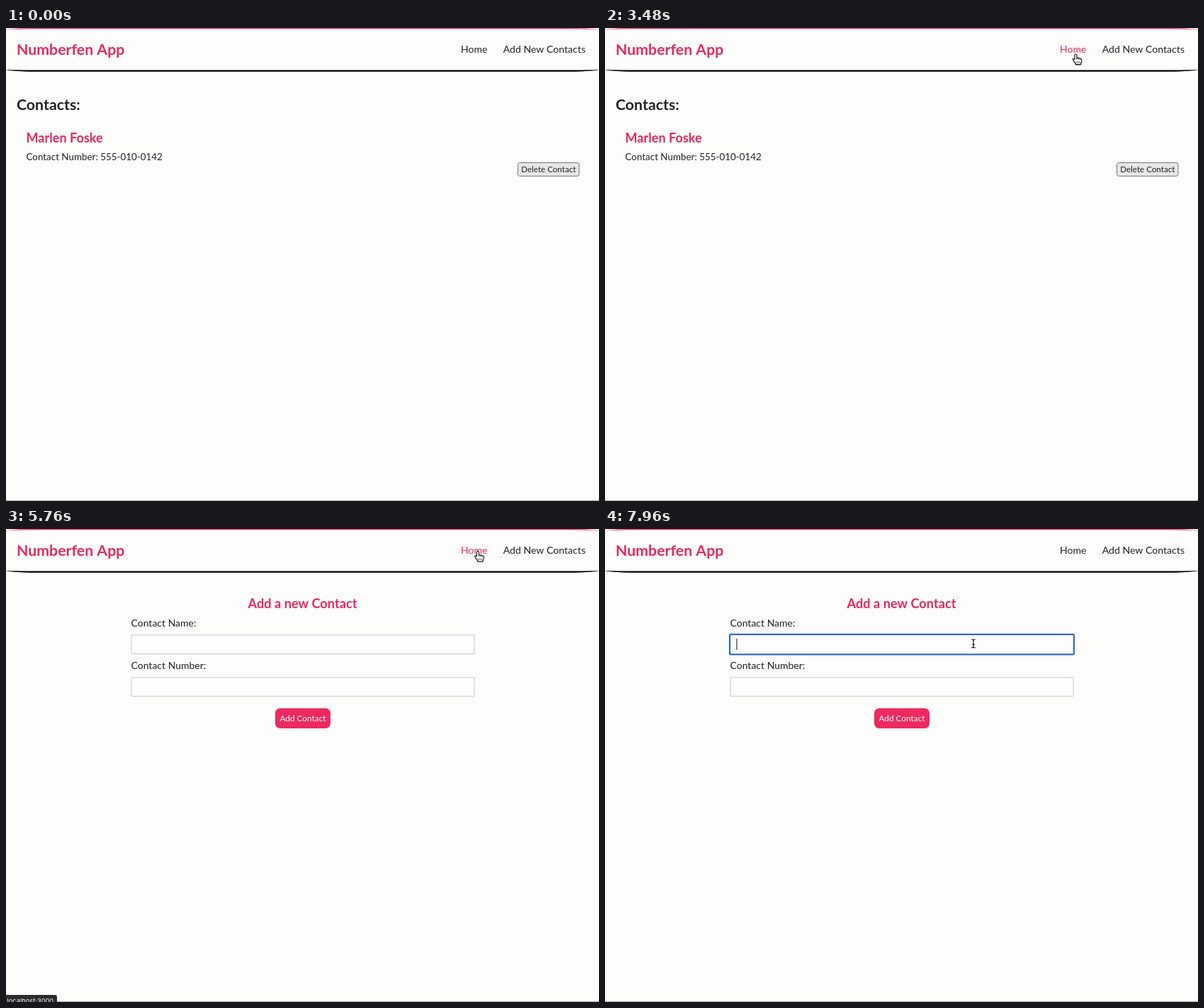
Write an HTML page with a canvas that moves like this. It is 837 by 669 pixels and loops after 8 s.

```html
<!DOCTYPE html>
<html lang="en">
<head>
<meta charset="utf-8">
<title>Contacts</title>
<style>
  html, body { margin: 0; width: 100%; height: 100%; overflow: hidden; background: #fdfdfc; }
  canvas { display: block; }
</style>
</head>
<body>
<canvas id="stage" width="837" height="669"></canvas>
<script>
const W = 837, H = 669, LOOP = 8000;
const ctx = document.getElementById('stage').getContext('2d');
const PAPER = '#fdfdfc', PINK = '#e6295f', INK = '#222';
const SANS = 'Lato, "Open Sans", sans-serif';

// Pointer hot spot: time, x, y
const path = [
  [60, -12, 286], [840, 205, 306], [1280, 387, 161], [1600, 387, 161],
  [1720, 390, 159], [2480, 659, 35], [3360, 659, 35], [3800, 690, 50],
  [4240, 730, 33], [4760, 730, 33], [5120, 700, 52], [5520, 666, 32],
  [6040, 666, 32], [6480, 730, 32], [6880, 730, 32], [7520, 520, 162], [8000, 520, 162]
];
const addPages = [[4640, 5920], [6760, LOOP]];
const clicks = [[2960, 3120], [4520, 4700], [5800, 5980], [6600, 6780], [7740, 7900]];
const statuses = [
  [2600, 3420, 'localhost:3000', 72],
  [4320, 4860, 'localhost:3000/addcontacts', 128],
  [5480, 6160, 'localhost:3000', 72],
  [6550, 6960, 'localhost:3000/addcontacts', 128]
];
const FOCUS = 7780;

const within = (t, [a, b]) => t >= a && t < b;
const clamp = v => Math.max(0, Math.min(1, v));
const inside = (p, x, y, w, h) => p.x >= x && p.x <= x + w && p.y >= y && p.y <= y + h;

function pointerAt(t) {
  if (t < path[0][0]) return { x: -50, y: 286 };
  const i = path.findIndex(k => k[0] >= t);
  if (i < 1) return { x: path[0][1], y: path[0][2] };
  const [t0, x0, y0] = path[i - 1], [t1, x1, y1] = path[i];
  const u = (1 - Math.cos(Math.PI * (t - t0) / (t1 - t0))) / 2;
  return { x: x0 + (x1 - x0) * u, y: y0 + (y1 - y0) * u };
}

function text(str, x, y, size, color = INK, weight = 400, align = 'left', family = SANS) {
  ctx.font = `${weight} ${size}px ${family}`;
  ctx.fillStyle = color;
  ctx.textAlign = align;
  ctx.fillText(str, x, y);
}

function box(x, y, w, h, r, fill, stroke, line = 1) {
  ctx.beginPath();
  ctx.roundRect(x, y, w, h, r);
  if (fill) { ctx.fillStyle = fill; ctx.fill(); }
  if (stroke) { ctx.strokeStyle = stroke; ctx.lineWidth = line; ctx.stroke(); }
}

// Header border whose thickness tapers into the rounded corners
function edge(y, dir, thick, color) {
  const rx = 42, ry = 3, inner = ry - thick;
  const k = y - dir * ry;
  ctx.beginPath();
  ctx.moveTo(0, k);
  ctx.ellipse(rx, k, rx, ry, 0, Math.PI, dir * Math.PI / 2, dir > 0);
  ctx.ellipse(W - rx, k, rx, ry, 0, dir * Math.PI / 2, 0, dir > 0);
  ctx.ellipse(W - rx, k, rx, inner, 0, 0, dir * Math.PI / 2, dir < 0);
  ctx.ellipse(rx, k, rx, inner, 0, dir * Math.PI / 2, Math.PI, dir < 0);
  ctx.fillStyle = color;
  ctx.fill();
}

function header(home, add) {
  edge(0, -1, 1.3, '#ee2b66');
  edge(61.7, 1, 2.2, '#000');
  text('Numberfen App', 15, 38, 21.3, PINK, 700);
  text('Home', 642, 35, 14, home ? PINK : INK);
  text('Add New Contacts', 818, 35, 14.1, add ? PINK : INK, 400, 'right');
}

function contacts(p) {
  text('Contacts:', 15, 116, 21.3, INK, 700);
  if (inside(p, 15, 137, 808, 82)) {
    ctx.save();
    ctx.shadowColor = 'rgba(70, 70, 130, 0.3)';
    ctx.shadowBlur = 4;
    ctx.shadowOffsetY = 1.5;
    box(15, 137.5, 808, 81.5, 0, PAPER);
    ctx.restore();
  }
  text('Marlen Foske', 28.5, 162, 18.1, PINK, 700);
  text('Contact Number: 555-010-0142', 28.5, 186.5, 13.4);
  box(722.5, 190.5, 86.5, 19, 3, '#e6e6e6', '#77777c');
  text('Delete Contact', 765.8, 204, 11.6, INK, 400, 'center');
}

function field(y, focused) {
  box(177, y, 484, 26.5, 0, '#fdfdfd', '#c9c9c7');
  if (focused) box(176, y - 1, 486, 28.5, 1, null, '#2968c8', 2);
}

function form(t) {
  const focused = t >= FOCUS;
  text('Add a new Contact', 418.5, 112, 18.2, PINK, 700, 'center');
  text('Contact Name:', 176.5, 138, 14);
  field(150, focused);
  text('Contact Number:', 176.5, 198, 14);
  field(210, false);
  if (focused) {
    ctx.fillStyle = '#111';
    ctx.fillRect(185.5, 155, 1, 16);
  }
  box(380, 253.5, 78, 28.5, 7, '#ed2a60');
  text('Add Contact', 419, 272, 11.8, '#fff', 400, 'center');
}

function status(t) {
  for (const [a, b, label, w] of statuses) {
    const alpha = Math.min(clamp((t - a) / 150), clamp((b - t) / 150));
    if (alpha <= 0) continue;
    ctx.globalAlpha = alpha;
    box(0, 659, w, 14, [0, 3, 0, 0], '#2b2b2d');
    text(label, 1.5, 670.5, 9.3, '#f4f4f4', 400, 'left', 'Inter, "Noto Sans", sans-serif');
    ctx.globalAlpha = 1;
  }
}

const arrow = new Path2D('M0 0V12L2.8 9.4L4.7 13.8L6.7 13L4.8 8.7H8.6Z');
const hand = new Path2D('M-1.5 1Q-1.5 -.6 0 -.6Q1.4 -.6 1.5 1V5Q3 3.9 3.9 5.2' +
  'Q5.4 4.4 6.1 5.8Q8.2 5.3 8.3 7.4V9.5Q8.1 11.2 7 12.3V14H-.2V12.4' +
  'Q-1.6 11.2-2.7 9.2L-4.1 7.1Q-4.5 5.6-3 5.7Q-2.1 6-1.5 7Z');
const knuckles = new Path2D('M1.5 4.5V7M3.9 5.2V7.4M6.1 5.8V7.8M1.3 9.5V12M3.3 9.5V12M5.3 9.5V12');
const beam = new Path2D('M-3 -6Q-.6 -6 0 -4.8Q.6 -6 3 -6M0 -4.8V4.8M-3 6Q-.6 6 0 4.8Q.6 6 3 6M-1.5 1.3H1.5');

function outline(shape, color, width) {
  ctx.strokeStyle = color;
  ctx.lineWidth = width;
  ctx.stroke(shape);
}

function pointer(p, kind) {
  ctx.save();
  ctx.translate(p.x, p.y);
  ctx.lineJoin = 'round';
  if (kind === 'beam') {
    outline(beam, '#fff', 2.6);
    outline(beam, '#111', 1.2);
  } else {
    const isHand = kind === 'hand';
    ctx.shadowColor = 'rgba(0, 0, 0, 0.35)';
    ctx.shadowBlur = 2;
    ctx.shadowOffsetY = 1;
    if (!isHand) outline(arrow, '#fff', 1.8);
    ctx.fillStyle = isHand ? '#fff' : '#000';
    ctx.fill(isHand ? hand : arrow);
    ctx.shadowColor = 'transparent';
    if (isHand) {
      outline(hand, '#111', 1.1);
      outline(knuckles, '#222', 0.8);
    }
  }
  ctx.restore();
}

function ring(p) {
  ctx.beginPath();
  ctx.arc(p.x, p.y, 24.5, 0, Math.PI * 2);
  ctx.strokeStyle = '#0c0c0c';
  ctx.lineWidth = 2.2;
  ctx.stroke();
}

function draw(t) {
  const p = pointerAt(t);
  const onHome = inside(p, 640, 19, 41, 25);
  const onAdd = inside(p, 702, 19, 117, 25);
  const adding = addPages.some(s => within(t, s));
  const onField = adding && (inside(p, 177, 150, 484, 27) || inside(p, 177, 210, 484, 27));
  const onButton = adding ? inside(p, 380, 253, 78, 29) : inside(p, 722, 190, 87, 20);

  ctx.fillStyle = PAPER;
  ctx.fillRect(0, 0, W, H);
  header(onHome, onAdd);
  if (adding) form(t); else contacts(p);
  ctx.fillStyle = '#aaa99f';
  ctx.fillRect(0, 668, W, 1);
  status(t);
  if (clicks.some(s => within(t, s))) ring(p);
  pointer(p, onField ? 'beam' : onHome || onAdd || onButton ? 'hand' : 'arrow');
}

const start = performance.now();
function tick() {
  draw((performance.now() - start) % LOOP);
  requestAnimationFrame(tick);
}
tick();
</script>
</body>
</html>
```
